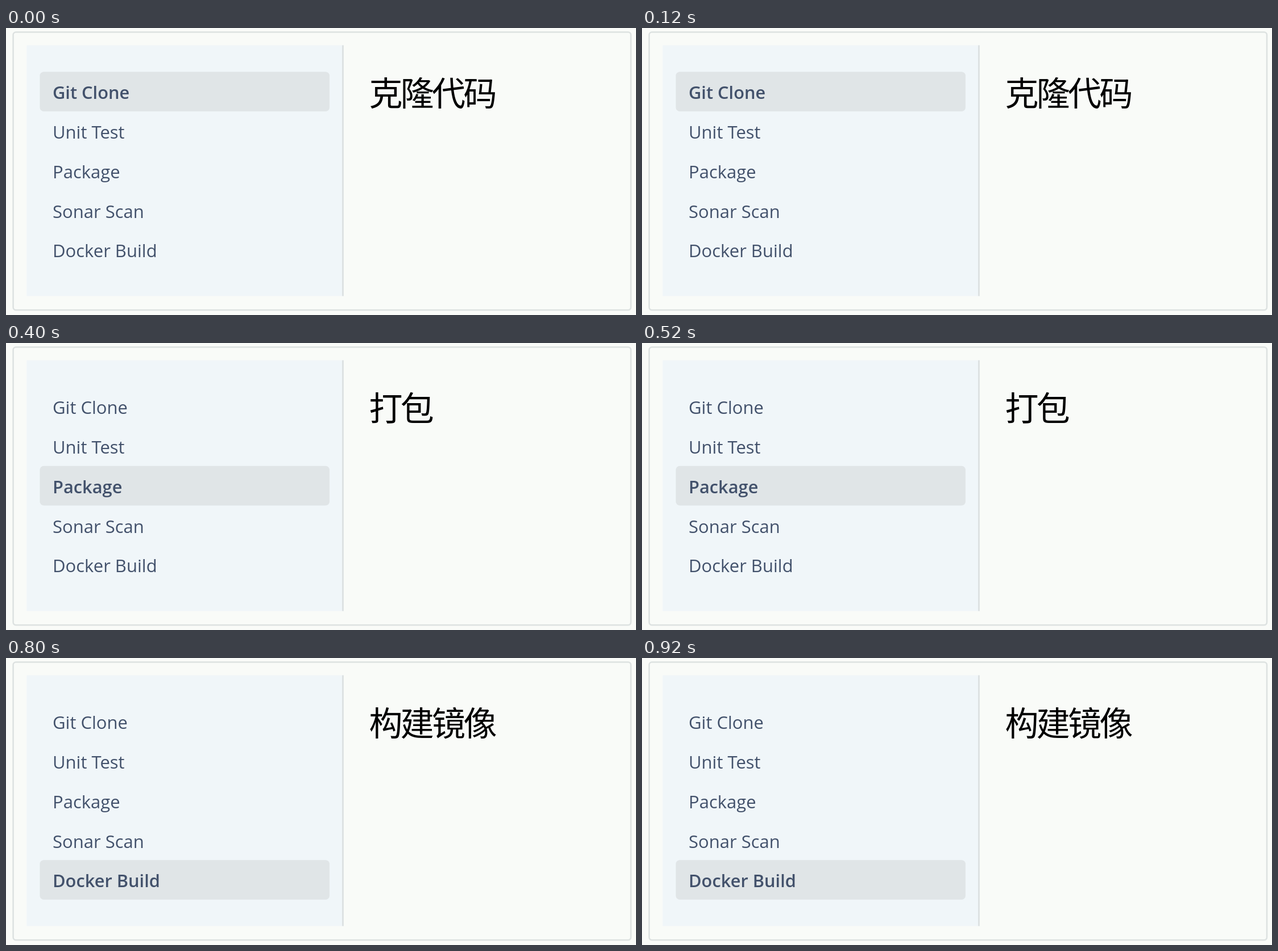
Animation of 1108x506 px, one loop 1000 ms. Source, as an HTML page with a canvas:

```html
<!DOCTYPE html>
<html lang="zh-CN">
<head>
<meta charset="utf-8">
<title>Pipeline steps</title>
<style>
html, body { margin: 0; width: 100%; height: 100%; overflow: hidden; background: #f9fbf8; }
canvas { display: block; }
</style>
</head>
<body>
<canvas id="stage" width="1108" height="506"></canvas>
<script>
const ctx = document.getElementById('stage').getContext('2d');
const STEP_MS = 200;
const ROW_TOP = 77.2;
const ROW_H = 69.75;
const steps = [
  ['Git Clone', '克隆代码'],
  ['Unit Test', '单元测试'],
  ['Package', '打包'],
  ['Sonar Scan', '代码扫描'],
  ['Docker Build', '构建镜像']
];

function rect(x, y, w, h, color) {
  ctx.fillStyle = color;
  ctx.fillRect(x, y, w, h);
}

function roundRect(x, y, w, h, r) {
  ctx.beginPath();
  ctx.roundRect(x, y, w, h, r);
}

function text(str, x, y, font, color, spacing = '0px') {
  ctx.font = font;
  ctx.letterSpacing = spacing;
  ctx.fillStyle = color;
  ctx.fillText(str, x, y);
}

function drawPanels() {
  rect(0, 0, 1108, 506, '#f9fbf8');
  ctx.strokeStyle = '#dde2e1';
  ctx.lineWidth = 2.6;
  roundRect(12.6, 7.2, 1086.4, 490, 5);
  ctx.stroke();
  rect(36.5, 30.5, 557.5, 442, '#f0f6f9');
  rect(591, 30.5, 3, 442, '#dde2e3');
}

function drawMenu(active) {
  ctx.fillStyle = '#e0e5e7';
  roundRect(59.5, ROW_TOP + active * ROW_H, 509.5, ROW_H, 7);
  ctx.fill();
  steps.forEach(([label], i) => {
    const style = i === active ? '600 30.8px' : '400 31px';
    text(label, 82, 125.4 + i * ROW_H, style + ' "Open Sans", "Noto Sans", sans-serif', '#42516b');
  });
}

function draw(now) {
  const active = Math.floor(now / STEP_MS) % steps.length;
  drawPanels();
  drawMenu(active);
  text(steps[active][1], 638.5, 137,
    '350 59px "Noto Sans CJK SC", "Noto Sans CJK", sans-serif', '#000', '-3.7px');
}

let start;
function tick(now) {
  if (start === undefined) start = now;
  draw(now - start);
  requestAnimationFrame(tick);
}
draw(0);
requestAnimationFrame(tick);
</script>
</body>
</html>
```
